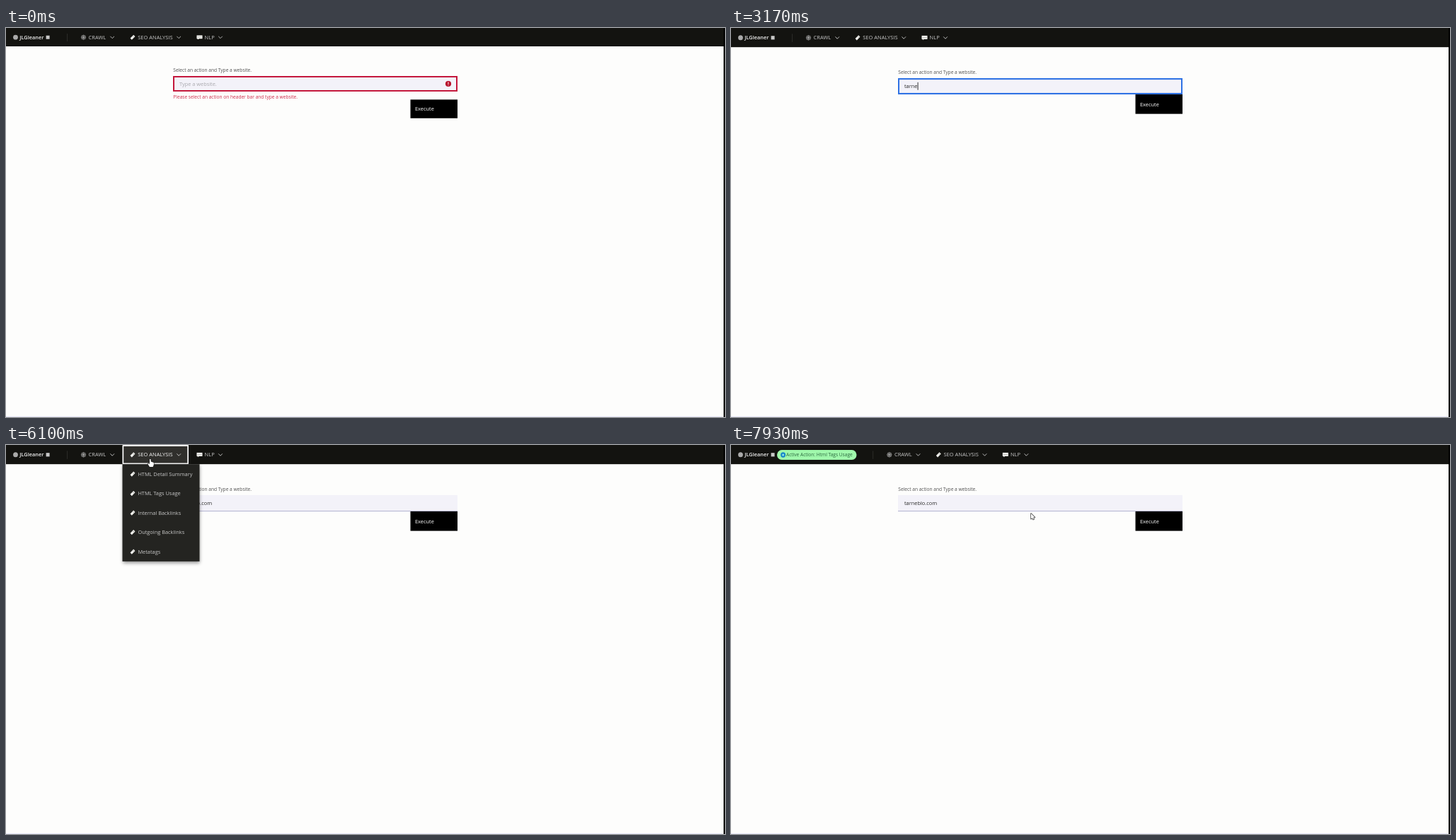
These frames come from a looping animation (1016 by 551 pixels, 8 s). An HTML page with a canvas:

```html
<!DOCTYPE html>
<html lang="en">
<head>
<meta charset="utf-8">
<title>Site crawler</title>
<style>
html, body { margin: 0; width: 100%; height: 100%; overflow: hidden; background: #000; }
canvas { display: block; }
</style>
</head>
<body>
<canvas id="stage" width="1016" height="551"></canvas>
<script>
const ctx = document.getElementById('stage').getContext('2d');
const W = 1016, H = 551, LOOP = 8000;
const FONT = '"Open Sans", "Noto Sans", sans-serif';
const ADDRESS = 'tarneblo.com';
const WORD = 'tarneblo';

// Moments at which things happen, in ms
const LETTERBOX = 100, FOCUS = 230, STRETCH = 2970, MISSPELT = 3900;
const OPEN = 6070, PICK = 7400;
const KEYS = [2670, 2870, 2970, 3070, 3170, 3430, 3530, 3630, 3830, 3990, 4070, 4230];
const CURSOR = [
  [5570, 262, 104], [5850, 232, 58], [6040, 204, 20], [6200, 204, 20],
  [6500, 214, 40], [6900, 243, 65], [7030, 243, 65], [7200, 261, 69],
  [PICK, 261, 69], [7900, 424, 97]
];
const ITEMS = ['HTML Detail Summary', 'HTML Tags Usage', 'Internal Backlinks', 'Outgoing Backlinks', 'Metatags'];
const ROW = 26.35, HEADER = 26;

function rect(x, y, w, h, fill) {
  ctx.fillStyle = fill;
  ctx.fillRect(x, y, w, h);
}

function frame(x, y, w, h, color, line = 2) {
  ctx.strokeStyle = color;
  ctx.lineWidth = line;
  ctx.strokeRect(x + line / 2, y + line / 2, w - line, h - line);
}

function dot(x, y, r, fill) {
  ctx.fillStyle = fill;
  ctx.beginPath();
  ctx.arc(x, y, r, 0, 7);
  ctx.fill();
}

// y is the middle of the capitals
function text(str, x, y, color, size = 7.4, weight = 400) {
  ctx.font = `${weight} ${size}px ${FONT}`;
  ctx.fillStyle = color;
  ctx.fillText(str, x, y + size * 0.357);
}

function textWidth(str) {
  ctx.font = `400 7.4px ${FONT}`;
  return ctx.measureText(str).width;
}

function polyline(points, color, line) {
  ctx.beginPath();
  points.forEach(([x, y]) => ctx.lineTo(x, y));
  ctx.strokeStyle = color;
  ctx.lineWidth = line;
  ctx.stroke();
}

function cursorAt(t) {
  if (t < CURSOR[0][0]) return null;
  const i = CURSOR.findIndex(p => p[0] > t);
  if (i < 0) return CURSOR[CURSOR.length - 1].slice(1);
  const [t0, x0, y0] = CURSOR[i - 1], [t1, x1, y1] = CURSOR[i];
  const u = (t - t0) / (t1 - t0), k = u * u * (3 - 2 * u);
  return [x0 + (x1 - x0) * k, y0 + (y1 - y0) * k];
}

function caretOn(t) {
  if (t < FOCUS || t >= OPEN) return false;
  if (t < KEYS[0]) return t < 540 || (t >= 1070 && t < 1600) || t >= 2130;
  return t < 4770 || (t >= 5270 && t < 5800);
}

function chevron(x, y, turn) {
  ctx.save();
  ctx.translate(x, y);
  ctx.rotate(turn * Math.PI);
  polyline([[-2.8, -1.4], [0, 1.4], [2.8, -1.4]], '#c6c6c6', 0.9);
  ctx.restore();
}

function webIcon(x, y) {
  ctx.strokeStyle = '#aaa';
  ctx.lineWidth = 0.7;
  for (const r of [1.4, 3]) {
    ctx.beginPath();
    ctx.arc(x, y, r, 0, 7);
    ctx.stroke();
  }
  for (let i = 0; i < 4; i++) {
    const dx = 3.4 * Math.cos(i * Math.PI / 4), dy = 3.4 * Math.sin(i * Math.PI / 4);
    polyline([[x - dx, y - dy], [x + dx, y + dy]], '#aaa', 0.6);
  }
}

function labelIcon(x, y) {
  ctx.save();
  ctx.translate(x, y);
  ctx.rotate(-Math.PI / 4);
  rect(-3.3, -1.6, 6.6, 3.2, '#f2f2ee');
  rect(1, -0.5, 1, 1, '#777');
  ctx.restore();
}

function bubbleIcon(x, y) {
  rect(x, y - 2.6, 8, 4.8, '#f4f4f0');
  rect(x + 1.2, y + 2, 1.6, 1, '#f4f4f0');
  for (let i = 0; i < 3; i++) rect(x + 1.6 + i * 2, y - 0.6, 0.9, 0.9, '#666');
}

function drawForm(t) {
  const invalid = t < KEYS[0], focused = t < OPEN;
  text('Select an action and Type a website.', 236.3, 59.4, '#525252', 6.62);
  rect(236, 68, 402, 22, '#f3f2f9');

  if (invalid) {
    frame(236, 68, 402, 22, t < LETTERBOX ? '#c4183c' : '#dd3a5c');
    text('Type a website.', 245, 79, '#a9a9ae');
    dot(625, 79, 4.1, '#b8122c');
    rect(624.5, 76.6, 1, 3, '#fff');
    rect(624.5, 80.5, 1, 1, '#fff');
    text('Please select an action on header bar and type a website.', 236.3, 97.2, '#d02c4c', 6.6);
  } else {
    if (focused) frame(236, 68, 402, 22, '#2f72e4');
    else rect(236, 89.2, 402, 0.9, '#adadcc');
  }

  const typed = ADDRESS.slice(0, KEYS.filter(k => t >= k).length);
  text(typed, 245, 79, '#2a2a2a');
  if (t >= MISSPELT && focused) {
    const wave = [], end = textWidth(WORD);
    for (let x = 0; x <= end; x++) wave.push([245 + x, 83.2 + (x % 2 ? 0.5 : -0.5)]);
    polyline(wave, '#e05050', 0.8);
  }
  if (caretOn(t)) rect(245.2 + textWidth(typed), 73.6, 0.9, 10.4, '#222');

  const top = invalid ? 101.4 : 90;
  rect(571.5, top, 66.5, 26.4, '#000');
  text('Execute', 578, top + 13.3, '#fff');
}

function drawHeader(t, hover) {
  const picked = t >= PICK, open = t >= OPEN && !picked;
  const dx = picked ? 114.3 : 0;
  rect(0, 0, W, HEADER, '#131310');
  dot(13.5, 13.2, 3.4, '#aaa');
  text('JLGleaner', 19.2, 13, '#f4f4f4', 7.4, 600);
  rect(56.6, 10.7, 5, 5, '#c8c8c8');
  rect(86 + dx, 8, 0.8, 11, '#33332f');

  if (picked) {
    ctx.fillStyle = '#a0f8ac';
    ctx.beginPath();
    ctx.roundRect(65, 6.8, 112.5, 13.2, 6.6);
    ctx.fill();
    dot(73.6, 13.4, 3.5, '#1687c8');
    dot(73.6, 13.4, 1.5, '#8fe4e4');
    text('Active Action: Html Tags Usage', 78, 13.4, '#2c6a40', 6.6);
  }

  if (hover) rect(165, 0, 93, HEADER, '#302f2c');
  webIcon(109.5 + dx, 13.2);
  text('CRAWL', 116.6 + dx, 13, '#c6c6c6', 7.5);
  chevron(150.2 + dx, 13.2, 0);
  labelIcon(179 + dx, 13.2);
  text('SEO ANALYSIS', 186.2 + dx, 13, open || hover ? '#f4f4f4' : '#c6c6c6', 7.5);
  chevron(244.2 + dx, 13.2, open ? Math.max(0, Math.min(1, (t - 6110) / 110)) : 0);
  bubbleIcon(269.5 + dx, 13);
  text('NLP', 280.6 + dx, 13, '#c6c6c6', 7.5);
  chevron(303 + dx, 13.2, 0);
  if (open) frame(164.5, 0, 93.5, HEADER, '#fff', 1.7);
}

function drawMenu(hovered) {
  ctx.save();
  ctx.shadowColor = 'rgba(0,0,0,.45)';
  ctx.shadowBlur = 5;
  ctx.shadowOffsetY = 2;
  rect(164.5, HEADER, 109, ROW * ITEMS.length, '#242421');
  ctx.restore();
  ITEMS.forEach((item, i) => {
    const y = HEADER + ROW * i, on = i === hovered;
    if (on) rect(164.5, y, 109, ROW, '#353533');
    labelIcon(179, y + 13.3);
    text(item, 186.4, y + 13.1, on ? '#fff' : '#c6c6c6');
  });
}

function drawCursor([x, y], hand) {
  const arrow = [[0, 0], [0, 7.8], [1.8, 6.2], [2.9, 8.7], [4.1, 8.1], [3, 5.7], [5.4, 5.5]];
  const pointer = [[-1, 0], [0.4, 0], [0.8, 3.6], [4.8, 5], [4.8, 8], [3.6, 11], [-1, 11], [-3.6, 7], [-2.8, 6], [-1, 7]];
  ctx.beginPath();
  (hand ? pointer : arrow).forEach(([px, py]) => ctx.lineTo(x + px, y + py));
  ctx.closePath();
  ctx.lineJoin = 'round';
  ctx.lineWidth = 1.3;
  ctx.strokeStyle = '#222';
  ctx.stroke();
  ctx.fillStyle = '#fff';
  ctx.fill();
}

function draw(t) {
  const boxed = t >= LETTERBOX && t < STRETCH;
  const stretch = t >= STRETCH ? 1.045 : 1;
  const cursor = cursorAt(t);
  const onHeader = cursor && cursor[1] < 27;

  rect(0, 0, W, H, '#000');
  ctx.save();
  if (boxed) {
    ctx.beginPath();
    ctx.rect(0, 11, W, 527);
    ctx.clip();
    ctx.translate(0, 11.4);
    ctx.scale(1.002, 1);
  } else {
    ctx.scale(1, stretch);
  }
  rect(0, -1, W, H + 1, '#fdfdfc');
  drawForm(t);
  drawHeader(t, onHeader);
  if (t >= OPEN && t < PICK) {
    drawMenu(onHeader ? -1 : Math.floor((cursor[1] / stretch - HEADER) / ROW));
  }
  ctx.restore();

  if (!boxed) {
    rect(0, H - 1, W, 1, '#e9e9fa');
    rect(W - 2, 0, 2, H, '#000');
  }
  if (cursor) drawCursor(cursor, onHeader);
}

const start = performance.now();
function tick() {
  draw((performance.now() - start) % LOOP);
  requestAnimationFrame(tick);
}
tick();
</script>
</body>
</html>
```
